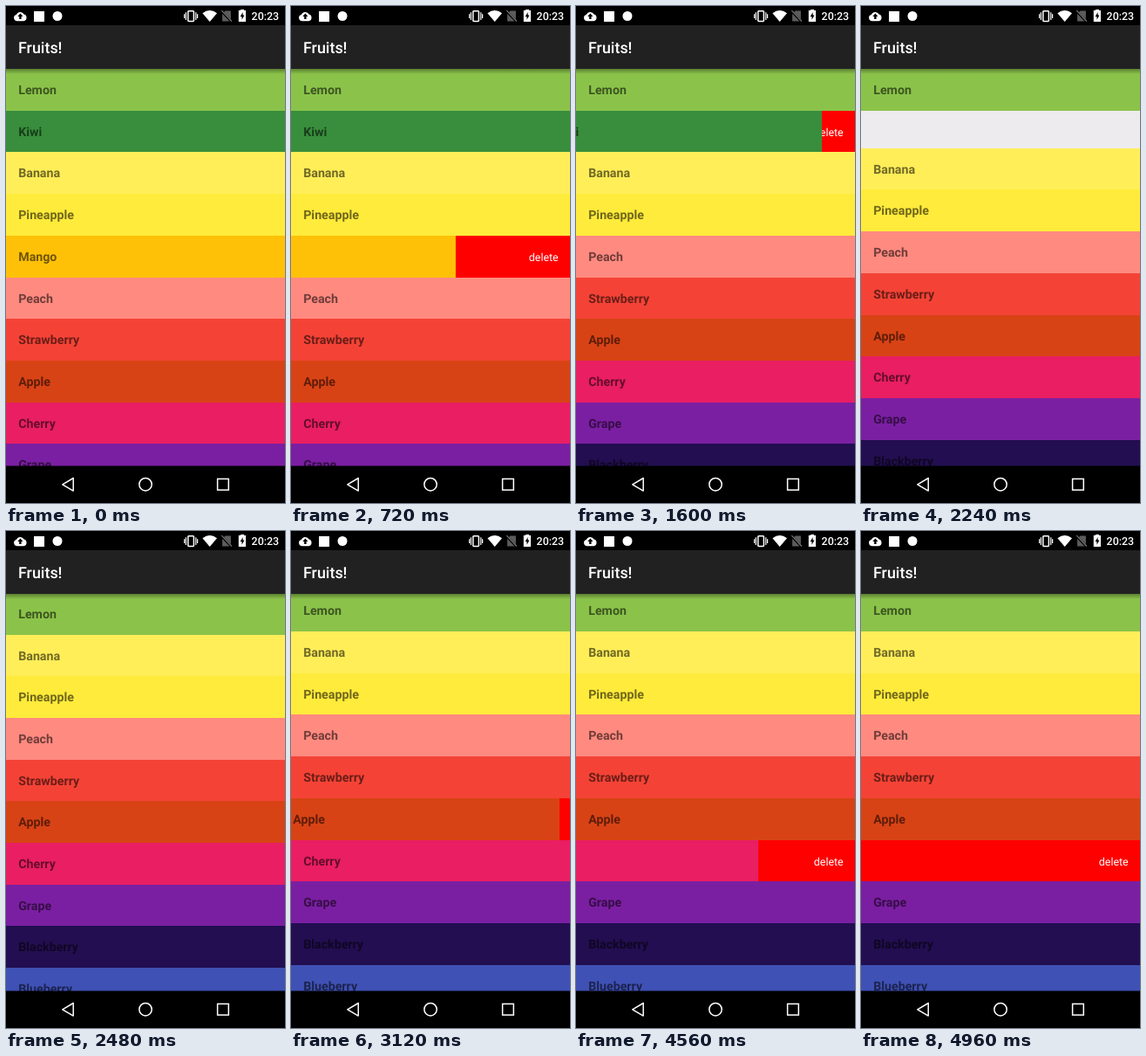
Animation, 320 px wide and 569 px high, one loop 5.04 s. Source, as an HTML page:

```html
<!DOCTYPE html>
<html lang="en">
<head>
<meta charset="utf-8">
<title>Fruits!</title>
<style>
  html, body { margin: 0; width: 100%; height: 100%; overflow: hidden; background: #000; }
  svg { display: block; width: 100%; height: 100%; }
  text { font-family: Roboto, "Open Sans", sans-serif; fill: #fff; text-rendering: geometricPrecision; }
  .label { font-size: 14.22px; font-weight: 700; fill: #000; fill-opacity: .56; }
  .delete { font-size: 12.44px; }
  .line { fill: none; stroke: #fff; stroke-width: 1.5; }
</style>
</head>
<body>
<svg viewBox="0 0 320 569">
  <defs>
    <linearGradient id="shade" x2="0" y2="1">
      <stop stop-opacity=".34"/><stop offset="1" stop-opacity="0"/>
    </linearGradient>
  </defs>
  <rect width="320" height="569" fill="#edebee"/>
  <g id="list"></g>
  <rect y="72" width="320" height="6" fill="url(#shade)"/>

  <rect width="320" height="22" fill="#000"/>
  <rect y="22" width="320" height="50" fill="#212121"/>
  <text x="14" y="54" font-size="17.9" font-weight="500">Fruits!</text>

  <g fill="#fff">
    <path d="M12.4 17.2a3.6 3.6 0 0 1-.5-7.1a4.7 4.7 0 0 1 8.7-.5a3.9 3.9 0 0 1-.2 7.6z"/>
    <path d="M16.4 8.6l3.1 3.5h-1.9v2.9h-2.4v-2.9h-1.9z" fill="#000"/>
    <rect x="32" y="6" width="12" height="12"/>
    <circle cx="59" cy="11.5" r="5.5"/>
    <g class="line">
      <rect x="208.8" y="5.8" width="6.6" height="11.6" rx=".8"/>
      <path d="M206.4 7.2v8.8M204.6 9.2v4.8M217.8 7.2v8.8M219.6 9.2v4.8" stroke-width="1.2"/>
    </g>
    <path d="M225.4 8.2Q233.7 2 242 8.2L233.7 18z"/>
    <path d="M251.5 5.5h6.4v12h-9.8v-8.6z" fill="#5c5c5c"/>
    <path d="M246.8 5.6l12 12.4" stroke="#000" stroke-width="2.6"/>
    <path d="M247.3 5.2l11.6 12.3" stroke="#777" stroke-width="1.2"/>
    <path d="M269 5v-1h4v1h2v13h-8.2v-13z"/>
    <path d="M271.6 7l-3 5.2h1.9v3.6l3-5.2h-1.9z" fill="#000"/>
    <text x="281.6" y="16" font-size="12.44" font-weight="500">20:23</text>
  </g>

  <rect y="526.5" width="320" height="42.5" fill="#000"/>
  <g class="line">
    <path d="M77.2 540.5v14.6l-12.4-7.3z" stroke-linejoin="round"/>
    <circle cx="160" cy="547.7" r="7.2"/>
    <rect x="242.6" y="541.4" width="12.7" height="12.7"/>
  </g>
</svg>
<script>
const LOOP = 5040, STEP = 80, WIDTH = 320;
const TOP = 72.04, PITCH = 47.7, SCROLL = 4.69;
const FADE = 120, MOVE = 250;

// A swipe shows a first nudge at `touch`, then moves between `start` and `end`.
const fruits = [
  { name: 'Lemon', color: '#8bc34a' },
  { name: 'Kiwi', color: '#388e3c', swipe: { touch: 1360, nudge: 10, start: 1520, end: 2069, remove: true } },
  { name: 'Banana', color: '#ffee58' },
  { name: 'Pineapple', color: '#ffeb3b' },
  { name: 'Mango', color: '#ffc107', swipe: { touch: 80, nudge: 10, start: 480, end: 989, remove: true } },
  { name: 'Peach', color: '#ff8a80' },
  { name: 'Strawberry', color: '#f44336' },
  { name: 'Apple', color: '#d84315', swipe: { touch: 3120, nudge: 12, start: 3520, end: 4160, reach: 141 } },
  { name: 'Cherry', color: '#e91e63', swipe: { touch: 4160, nudge: 24, start: 4320, end: 4960 } },
  { name: 'Grape', color: '#7b1fa2' },
  { name: 'Blackberry', color: '#220e50' },
  { name: 'Blueberry', color: '#3f51b5' }
];

const clamp = v => Math.min(1, Math.max(0, v));
const easeInOut = v => (1 - Math.cos(Math.PI * clamp(v))) / 2;

function swipeOffset({ touch, nudge, start, end, reach }, t) {
  if (t < touch) return 0;
  const u = clamp((t - start) / (end - start));
  if (u === 1) return reach ? 0 : WIDTH;
  return reach
    ? nudge * (1 - u) + reach * Math.sin(Math.PI * u)
    : nudge + (WIDTH - nudge) * u ** 1.25;
}

const list = document.getElementById('list');
list.innerHTML = fruits.map(({ name, color }) => `
  <g>
    <g>
      <rect width="${WIDTH}" height="48" fill="#f00"/>
      <text class="delete" x="272.8" y="28.6">delete</text>
    </g>
    <g>
      <rect width="${WIDTH}" height="48" fill="${color}"/>
      <text class="label" x="14.2" y="29.4">${name}</text>
    </g>
  </g>`).join('');

fruits.forEach((fruit, i) => {
  fruit.row = list.children[i];
  [fruit.under, fruit.cover] = fruit.row.children;
});

function render(t) {
  let y = TOP - SCROLL * easeInOut((t - 2400) / 240);
  for (const { row, under, cover, swipe } of fruits) {
    const offset = swipe ? swipeOffset(swipe, t) : 0;
    const gone = swipe?.remove ? t - swipe.end : 0;
    row.setAttribute('transform', `translate(0 ${Math.round(y)})`);
    row.setAttribute('opacity', 1 - easeInOut(gone / FADE));
    under.setAttribute('visibility', offset ? 'visible' : 'hidden');
    cover.setAttribute('transform', `translate(${-offset} 0)`);
    y += PITCH * (1 - easeInOut((gone - FADE) / MOVE));
  }
}

const origin = performance.now();
function tick() {
  const t = (performance.now() - origin) % LOOP;
  render(Math.floor(t / STEP) * STEP);
  requestAnimationFrame(tick);
}
render(0);
requestAnimationFrame(tick);
</script>
</body>
</html>
```
